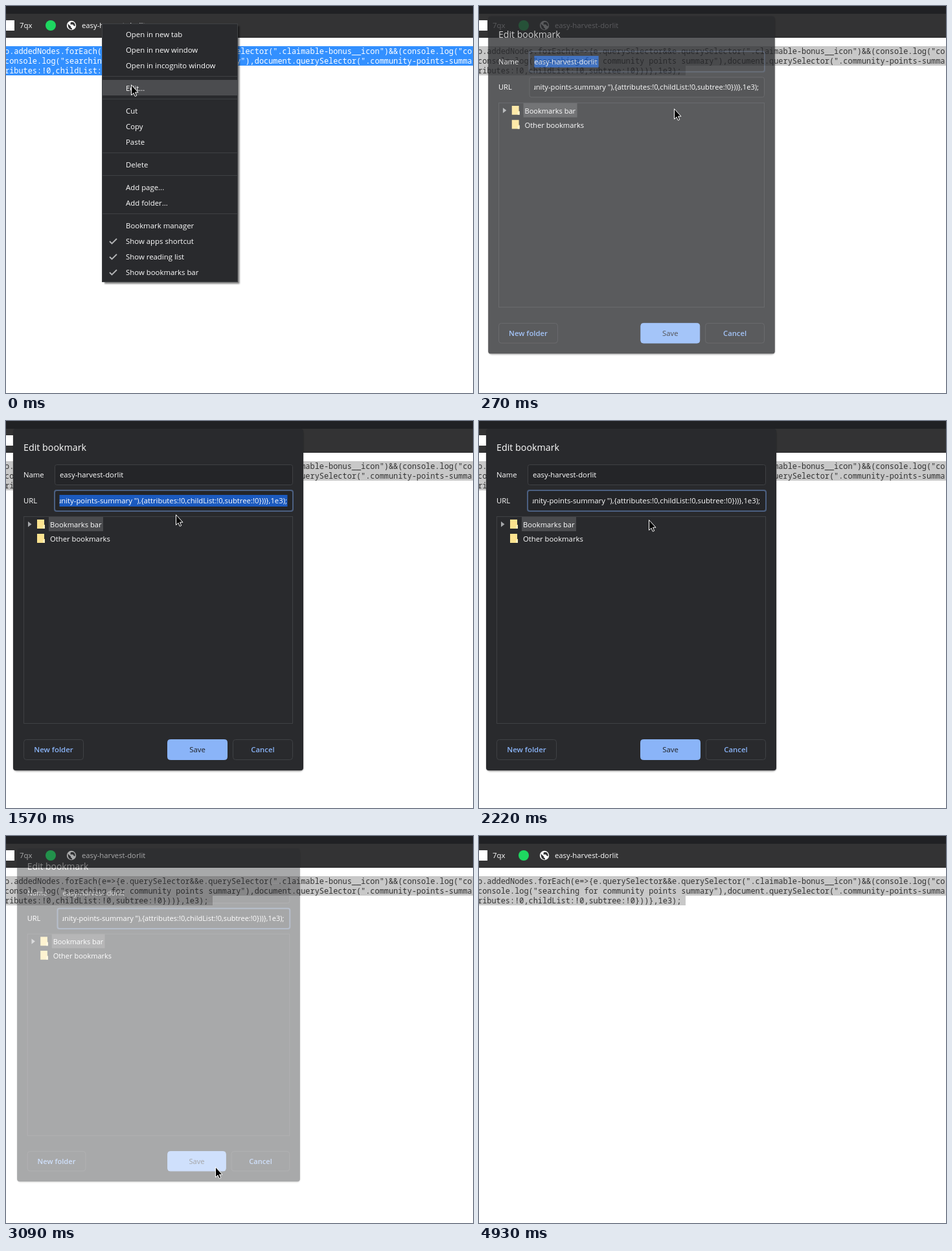
These frames come from a looping animation (721x597 px, 5030 ms). An HTML page:

```html
<!DOCTYPE html>
<html lang="en">
<head>
<meta charset="utf-8">
<title>Edit bookmark</title>
<style>
  html, body { margin: 0; width: 100%; height: 100%; overflow: hidden; background: #fff; }
  svg { display: block; width: 721px; height: 597px; }
  text { font-family: "Open Sans", "Noto Sans", sans-serif; white-space: pre; }
  .code text { font: 11.91px "Noto Sans Mono", "DejaVu Sans Mono", monospace; }
</style>
</head>
<body>
<svg id="stage" viewBox="0 0 721 597"></svg>
<script>
const LOOP = 5030;
const NAME = 'easy-harvest-dorlit';
const LINE = '#3f4144';
const LIGHT = '#fff';

const esc = s => s.replace(/&/g, '&amp;').replace(/</g, '&lt;').replace(/>/g, '&gt;');
const text = (x, y, s, size = 11.3, fill = LIGHT, more = '') =>
  `<text x="${x}" y="${y}" font-size="${size}" fill="${fill}" ${more}>${esc(s)}</text>`;
const rect = (x, y, w, h, fill, more = '') =>
  `<rect x="${x}" y="${y}" width="${w}" height="${h}" fill="${fill}" ${more}/>`;
const frame = (x, y, w, h, fill, r = 0, line = LINE) =>
  rect(x + .5, y + .5, w - 1, h - 1, fill, `rx="${r}" stroke="${line}"`);

function page() {
  const lines = [
    'o.addedNodes.forEach(e=>{e.querySelector&&e.querySelector(".claimable-bonus__icon")&&(console.log("co',
    'console.log("searching for community points summary"),document.querySelector(".community-points-summa',
    'ributes:!0,childList:!0,subtree:!0}))},1e3);'
  ];
  return rect(0, 0, 721, 597, '#fff') +
    `<path id="mark" d="M0 62H721V92H319V107H0Z"/>` +
    `<g id="code" class="code">${lines.map((s, i) => `<text x="-2" y="${74 + 15 * i}">${esc(s)}</text>`).join('')}</g>`;
}

function bar() {
  return rect(0, 0, 721, 12, '#202124') + rect(0, 12, 721, 37, '#333334') + rect(0, 48, 721, 1, '#28292a') +
    rect(-3, 22, 16, 16, '#fff') + text(21, 34, '7qx', 11.4) +
    '<circle cx="69" cy="30" r="8" fill="#1ed760"/>' +
    '<circle cx="101" cy="30" r="7.2" fill="#fff"/>' +
    '<path d="M95.6 27.5L100 31.5V33L102 34.5V36.6Q95 36 95.6 27.5ZM100 25H104Q107 27 106.8 31L104.5 30.5 103.5 28.5H99.5V27Z" fill="#333334"/>' +
    text(117, 34, NAME);
}

function menu() {
  const items = [
    [44, 'Open in new tab'], [68, 'Open in new window'], [92, 'Open in incognito window'],
    [127, 'Edit...'], [162, 'Cut'], [186, 'Copy'], [210, 'Paste'], [245, 'Delete'],
    [280, 'Add page...'], [304, 'Add folder...'], [339, 'Bookmark manager'],
    [363, 'Show apps shortcut', 1], [387, 'Show reading list', 1], [411, 'Show bookmarks bar', 1]
  ];
  return rect(152, 31, 208.5, 397.5, '#000', 'opacity=".5" filter="url(#soft)"') +
    frame(148, 27, 210, 399, '#292a2d') + rect(149, 114, 208, 24, '#4b4c4f') +
    [108, 143, 226, 261, 320].map(y => rect(149, y, 208, 1, LINE)).join('') +
    items.map(([y, s, on]) => text(185, y + 4, s, 11.4) +
      (on ? `<path d="M160 ${y}l3.5 3.5 7.5-7.5" fill="none" stroke="#b4b5b7" stroke-width="1.8"/>` : '')).join('');
}

const folder = y =>
  `<path d="M48 ${y}H59V${y + 8}H60V${y + 14}H48Z" fill="#fde38f"/>` +
  `<path d="M57 ${y + 14}V${y + 9}H60V${y + 14}Z" fill="#fff0bd"/>`;

const button = (x, w, s, ink, weight = 600, fill = 'none', line = LINE) =>
  frame(x, 491, w, 32, fill, 4, line) +
  text(x + w / 2, 511, s, 11.4, ink, `font-weight="${weight}" text-anchor="middle"`);

function dialog() {
  const url = '".community-points-summary "),{attributes:!0,childList:!0,subtree:!0}))},1e3);';
  return rect(11.5, 14, 447.5, 526.5, '#000', 'rx="5" opacity=".4" filter="url(#soft)"') +
    rect(11, 12, 448, 527, '#292a2d', 'rx="4"') +
    text(27, 46, 'Edit bookmark', 14.27) +
    text(27, 87, 'Name') + text(27, 127, 'URL') +
    frame(75, 67, 368, 32, '#242528', 3) + frame(75, 107, 368, 32, '#242528', 3) +
    rect(75, 67, 368, 32, 'none', 'id="ring" rx="3" stroke="#4b5f80" stroke-width="2"') +
    rect(83, 74, 100.5, 18, '#1b5abf', 'id="nameSel"') +
    rect(82.5, 114, 352, 18, '#1b5abf', 'id="urlSel"') +
    text(83, 87, NAME) +
    `<g clip-path="url(#field)">${text(434, 127, url, 11.3, LIGHT, 'text-anchor="end"')}</g>` +
    frame(27, 147, 416, 320, 'none') + rect(66, 148, 84, 22, '#4a4b4e') +
    '<path d="M34 155L39.5 159.2 34 163.5Z" fill="#a5a7aa"/>' +
    folder(152) + text(68, 164, 'Bookmarks bar', 11.2) +
    folder(174) + text(68, 186, 'Other bookmarks') +
    button(27, 93, 'New folder', '#8ab4f8') +
    button(249, 93, 'Save', '#202124', 500, '#8ab4f8', '#8ab4f8') +
    button(350, 93, 'Cancel', '#8ab4f8');
}

const cursors =
  '<path id="arrow" d="M.5 .7V16.5L4 13.2 6.3 18.4 8.7 17.3 6.5 12.2H11Z" fill="#000" stroke="#fff"/>' +
  '<g id="beam" fill="none"><path d="M-4-8H4M-4 8H4M0-8V8" stroke="#fff" stroke-width="3"/>' +
  '<path d="M-3-8H3M-3 8H3M0-8V8" stroke="#000"/></g>';

document.getElementById('stage').innerHTML =
  '<defs><filter id="soft"><feGaussianBlur stdDeviation="1.2"/></filter>' +
  '<clipPath id="field"><path d="M82.5 108H435V138H82.5Z"/></clipPath></defs>' +
  page() + bar() + `<g id="menu">${menu()}</g><g id="dialog">${dialog()}</g>` + cursors;

// time, x, y of the pointer; it jumps from one place to the next
const pointer = [
  [0, 193, 121], [120, 222, 131], [270, 301, 158], [390, 297, 135], [510, 240, 133],
  [660, 233, 124], [810, 240, 127], [930, 244, 128], [1050, 252, 135], [1170, 260, 141],
  [1570, 262, 144], [2220, 262, 152], [2340, 268, 260], [2460, 290, 440], [2580, 305, 525],
  [2730, 312, 518], [2850, 323, 510], [3360, 323, 505], [3510, 318, 477], [3660, 311, 461],
  [3780, 378, 515], [3900, 463, 585], [4050, 740, 610]
];

const $ = id => document.getElementById(id);
const show = (id, on) => $(id).setAttribute('display', on ? 'inline' : 'none');
const within = (t, a, b) => t >= a && t < b;

function draw(t) {
  const away = within(t, 270, 3210) || t >= 4930;
  $('mark').setAttribute('fill', away ? '#c8c8c8' : '#3390ff');
  $('code').setAttribute('fill', away ? '#323232' : '#fff');

  show('menu', t < 120);
  show('dialog', within(t, 270, 3210));
  const [scale, alpha] = t < 390 ? [.988, .77] : t < 3090 ? [1, 1] : [.975, .4];
  $('dialog').setAttribute('opacity', alpha);
  $('dialog').setAttribute('transform', `translate(235.5 276) scale(${scale}) translate(-235 -275.5)`);
  if (scale === 1) $('dialog').removeAttribute('transform');
  $('ring').setAttribute('y', t < 810 ? 67 : 107);
  $('ring').setAttribute('opacity', t < 390 ? .4 : 1);
  show('nameSel', t < 810);
  show('urlSel', within(t, 930, 2100));

  const [, x, y] = pointer.filter(p => p[0] <= t).pop();
  const typing = within(t, 390, 1170);
  show('arrow', !typing);
  show('beam', typing);
  $(typing ? 'beam' : 'arrow').setAttribute('transform', `translate(${x} ${y})`);
}

const start = performance.now();
function tick() {
  draw((performance.now() - start) % LOOP);
  requestAnimationFrame(tick);
}
tick();
</script>
</body>
</html>
```
